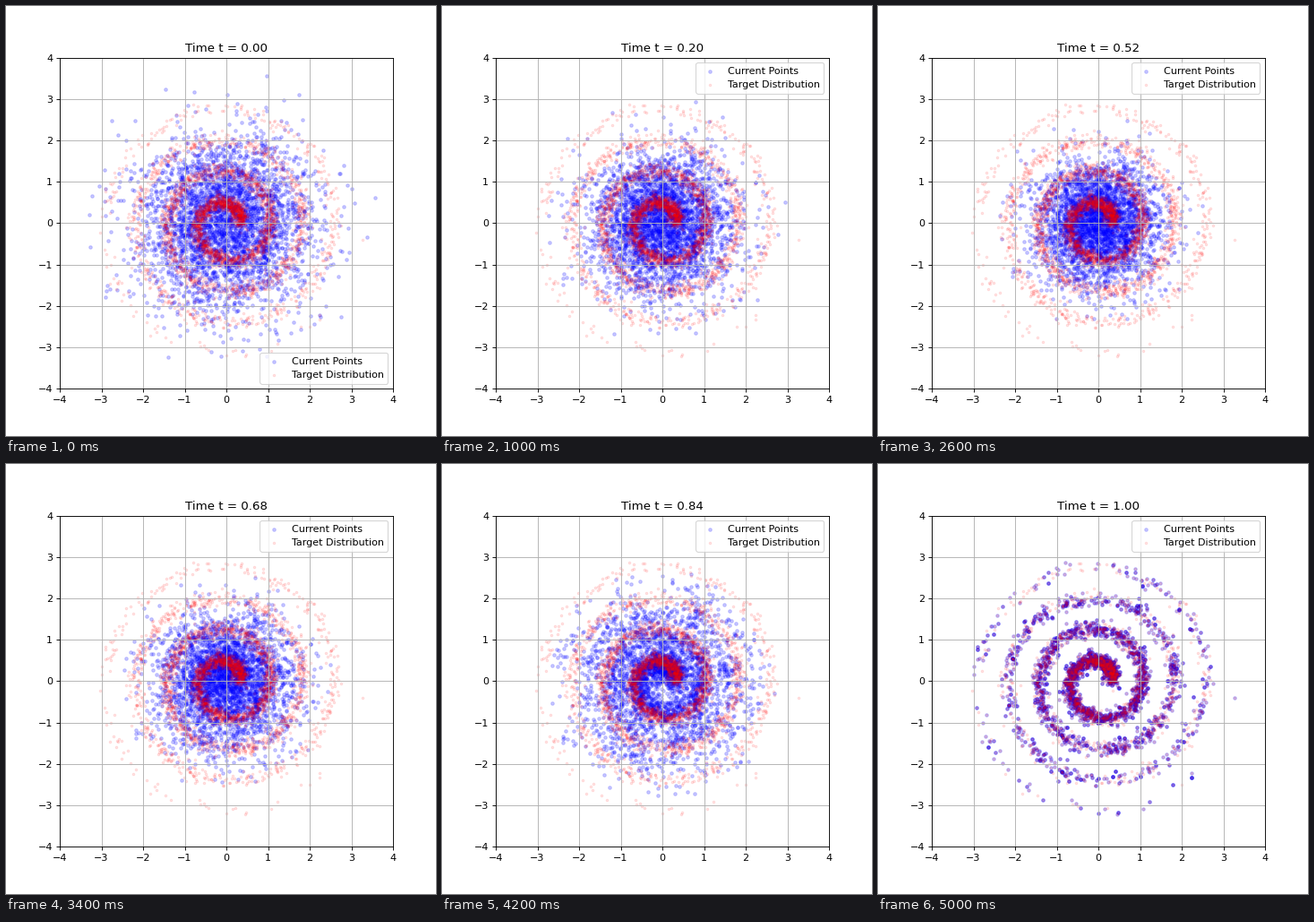
Write a matplotlib script that moves like this. It is 480 by 480 pixels and loops after 5050 ms.

```python
import numpy as np
import matplotlib.pyplot as plt
from matplotlib.animation import FuncAnimation

STEPS = 100
COUNT = 3500
TURNS = 4
NOISE = 0.095
LIM = 4

rng = np.random.default_rng(7)


def spiral(n):
    turn = TURNS * rng.beta(1, 2, n)
    angle = 2 * np.pi * turn
    radius = 0.31 + 0.75 * turn
    arm = np.column_stack([radius * np.cos(angle), radius * np.sin(angle)])
    return arm + rng.normal(scale=NOISE, size=arm.shape)


def expected_end(x, t, ends):
    """Posterior mean of the end point for x = (1 - t) * noise + t * end."""
    var = (1 - t) ** 2
    one = np.ones((len(ends), 1), np.float32)
    keys = np.hstack([ends, (ends ** 2).sum(axis=1, keepdims=True)]).T
    values = np.hstack([ends, one])
    means = []
    for part in np.array_split(x, 14):
        query = np.column_stack([part * t, np.full(len(part), -t * t / 2)])
        weight = (query / var).astype(np.float32) @ keys
        weight -= weight.max(axis=1, keepdims=True)
        np.exp(weight, out=weight)
        total = weight @ values
        means.append(total[:, :2] / total[:, 2:])
    return np.vstack(means)


def flow(x, ends):
    path = [x]
    for k in range(STEPS):
        t = k / STEPS
        velocity = (expected_end(x, t, ends) - x) / (1 - t)
        x = x + velocity / STEPS
        path.append(x)
    return path


target = spiral(COUNT).astype(np.float32)
path = flow(rng.normal(size=(COUNT, 2)).astype(np.float32), target)

fig, ax = plt.subplots(figsize=(6, 6), dpi=80)
current = ax.scatter(*path[0].T, s=10, color="blue", alpha=0.2,
                     label="Current Points")
ax.scatter(*target.T, s=5, color="red", alpha=0.1,
           label="Target Distribution")
ax.set_xlim(-LIM, LIM)
ax.set_ylim(-LIM, LIM)
ax.grid(True)
title = ax.set_title("Time t = 0.00")
legend = ax.legend(loc="lower right")


def update(i):
    current.set_offsets(path[i])
    title.set_text(f"Time t = {i / STEPS:.2f}")
    legend.set_loc("lower right" if i == 0 else "upper right")
    return current, title, legend


anim = FuncAnimation(fig, update, frames=STEPS + 1, interval=50,
                     init_func=lambda: update(0), repeat=True,
                     repeat_delay=0, blit=False)
plt.show()
```
